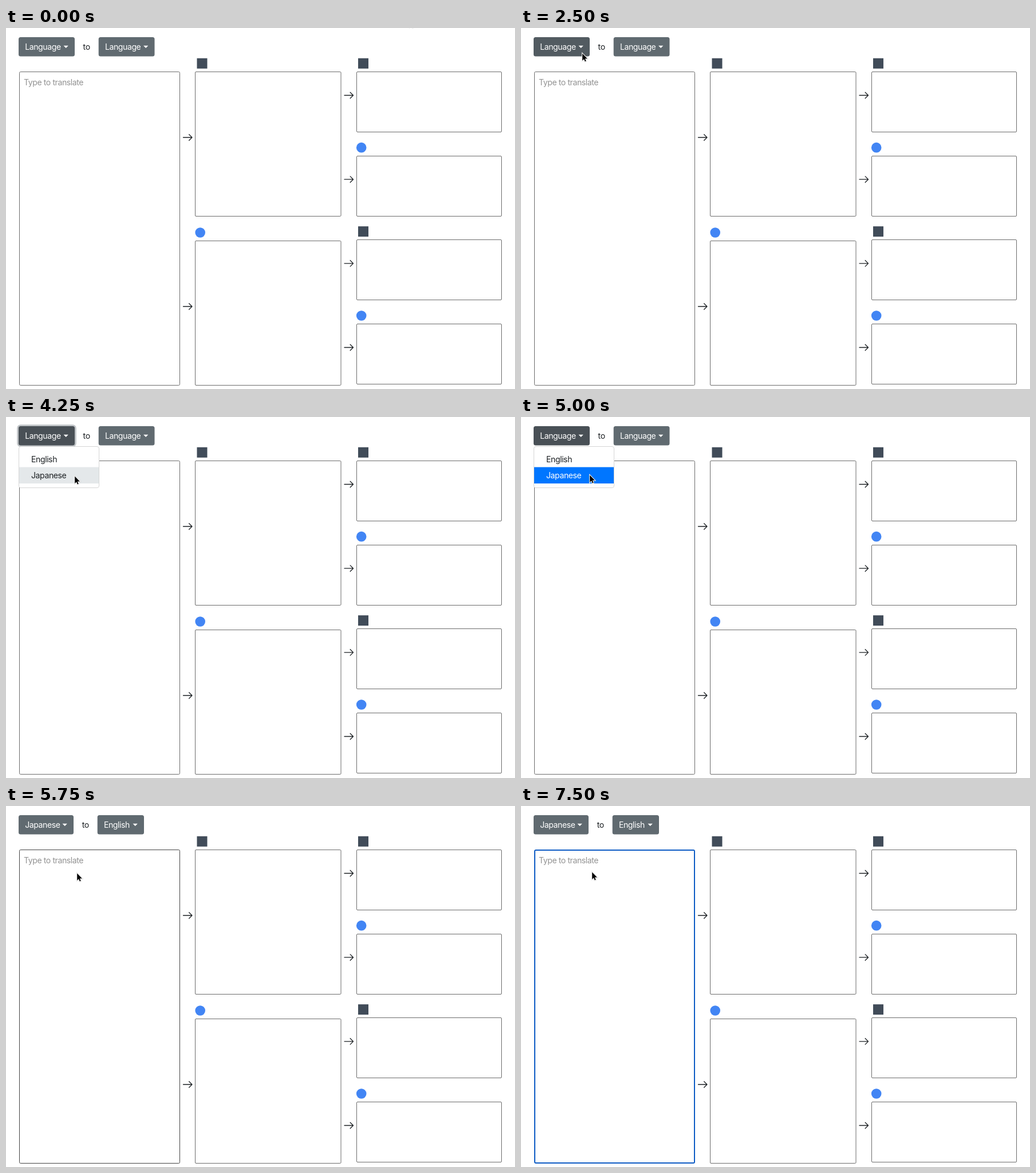
Write an HTML page that moves like this. It is 889 px wide and 630 px high and loops after 8 s.

```html
<!DOCTYPE html>
<html lang="en">
<head>
<meta charset="utf-8">
<style>
  html, body { margin: 0; width: 100%; height: 100%; overflow: hidden; background: #fff; }
  svg { display: block; font: 14.08px Inter, sans-serif; letter-spacing: -.03em; fill: #1d2124; }
  .box { fill: none; stroke: #6c6c6c; }
  .arrow { fill: none; stroke: #1d2124; stroke-width: 1.3; stroke-linecap: round; stroke-linejoin: round; }
  .label { fill: #fff; }
  #cursor { fill: #000; stroke: #fff; stroke-width: 2; paint-order: stroke; filter: drop-shadow(0 .8px .7px #0006); }
</style>
</head>
<body>
<svg width="889" height="630" viewBox="0 0 889 630">
  <g id="layout"></g>
  <rect id="input" class="box" rx="2"/>
  <text x="31" y="100" fill="#939393">Type to translate</text>
  <rect id="caret" x="31" y="87" width="1" height="16"/>
  <rect id="ring" fill="#c0c4c7"/>
  <g id="from"></g>
  <text id="to" y="38">to</text>
  <g id="into"></g>
  <g id="menu">
    <rect x="22.5" y="51.5" width="140" height="72" rx="3.5" fill="#fff" stroke="#d6d6d6"/>
    <rect id="highlight" x="23" y="87.5" width="139" height="28.5"/>
    <text x="44" y="78.5">English</text>
    <text id="choice" x="44" y="107">Japanese</text>
  </g>
  <path id="cursor" d="M1.2 .5V13L4 10.3L5.8 14.5L7.7 13.7L5.9 9.5H9.9Z"/>
</svg>
<script>
const $ = id => document.getElementById(id);
const set = (id, attrs) => Object.entries(attrs).forEach(([k, v]) => $(id).setAttribute(k, v));
const show = (id, on) => set(id, { visibility: on ? 'visible' : 'hidden' });

const box = (x, y, w, h) => `<rect class="box" x="${x}" y="${y}" width="${w}" height="${h}" rx="1.5"/>`;
const arrow = (x, y) => `<path class="arrow" d="M${x} ${y}h15.5m-5.3-5.3l5.3 5.3l-5.3 5.3"/>`;
const square = (x, y) => `<rect x="${x - 9}" y="${y - 9}" width="18" height="18" fill="#414c59"/>`;
const circle = (x, y) => `<circle cx="${x}" cy="${y}" r="8.8" fill="#4285f4"/>`;

const rows = [0, 1, 2, 3].map(i => 76.5 + i * 146.67);
$('layout').innerHTML =
  [76.5, 371.5].map(y => box(330.5, y, 254.5, 252) + arrow(309.5, y + 114.5)).join('') +
  rows.map((y, i) => box(612.5, Math.round(y - .5) + .5, 253, 105) + arrow(591, y + 41) +
    (i % 2 ? circle(620.7, y - 14.5) : square(624, y - 14.7))).join('') +
  square(342.5, 61.8) + circle(339.2, 357);

function button(id, label, x, width, fill) {
  const tip = x + width - 19.5;
  $(id).innerHTML = `<rect x="${x}" y="16" width="${width}" height="33.4" rx="3.5" fill="${fill}"/>
    <text class="label" x="${x + 11.2}" y="38">${label}</text>
    <path class="label" d="M${tip} 30.8h8.4l-4.2 4.2z"/>`;
}

// time, x, y of the pointer
const path = [
  [0, 704, -14.7], [250, 386, 145], [500, 241, 140], [750, 176, 75], [1000, 158, 66],
  [1500, 145, 66], [2250, 127, 58], [2500, 106, 44], [2750, 101, 41], [4250, 119, 103],
  [4750, 119, 102], [5000, 119, 101], [5250, 118, 100], [5500, 122, 114], [5750, 123, 117],
  [6000, 123, 116], [6250, 123, 115]
];
const GREY = '#606a70', HOVER = '#525b61', PRESSED = '#495056';

function draw(t) {
  const between = (a, b) => t >= a && t < b;
  const chosen = t >= 5250, focused = t >= 6000, clicked = t >= 5000;

  const [, x, y] = path.filter(p => p[0] <= t).pop();
  set('cursor', { transform: `translate(${x} ${y})` });

  const fill = between(2500, 2750) ? HOVER : between(2750, 5250) ? PRESSED : GREY;
  button('from', chosen ? 'Japanese' : 'Language', 22, chosen ? 96 : 98, fill);
  button('into', chosen ? 'English' : 'Language', chosen ? 159.7 : 161.7, chosen ? 81.3 : 97.8, GREY);
  set('to', { x: chosen ? 132.7 : 134.6 });

  const spread = t < 3000 ? 1 : 2.8;
  set('ring', { x: 22 - spread, y: 16 - spread, width: 98 + 2 * spread, height: 33.4 + 2 * spread, rx: 3.5 + spread });
  show('ring', between(2750, 5000));

  show('menu', between(3000, 5250));
  set('highlight', { fill: t < 4250 ? '#fff' : clicked ? '#0076ff' : '#e4e8ea' });
  set('choice', { fill: clicked ? '#fff' : '#1d2124' });

  const inset = focused ? 1 : .5;
  set('input', {
    x: 23 + inset, y: 76 + inset, width: 281 - 2 * inset, height: 548 - 2 * inset,
    style: focused ? 'stroke:#0d5bc4;stroke-width:2' : chosen ? 'stroke:#444' : ''
  });
  show('caret', focused && (t - 6000) % 1000 < 500);
}

let last = -1;
function tick(now) {
  const t = Math.floor(now % 8000 / 250) * 250;
  if (t !== last) draw(last = t);
  requestAnimationFrame(tick);
}
tick(0);
</script>
</body>
</html>
```
